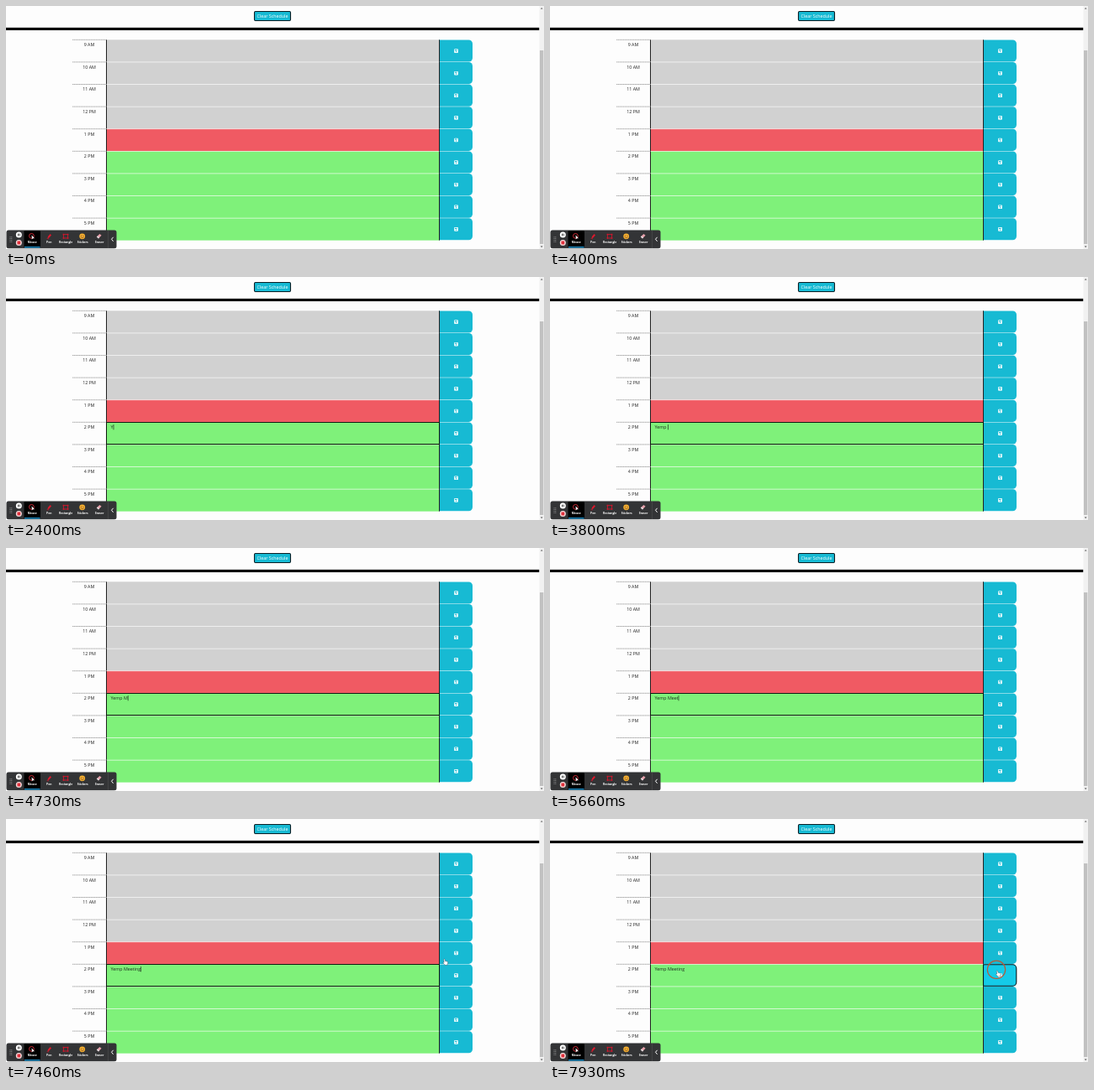
These frames come from a looping animation (640 px wide and 290 px high, 8 s). An HTML page with a canvas:

```html
<!DOCTYPE html>
<html lang="en">
<head>
<meta charset="utf-8">
<title>Day planner</title>
<style>
html, body { margin: 0; width: 100%; height: 100%; overflow: hidden; background: #fdfdfd; }
canvas { display: block; width: 640px; height: 290px; }
</style>
</head>
<body>
<canvas id="stage"></canvas>
<script>
const canvas = document.getElementById('stage');
const dpr = window.devicePixelRatio || 1;
canvas.width = 640 * dpr;
canvas.height = 290 * dpr;
const c = canvas.getContext('2d');

const LOOP = 8000, TOP = 40.3, ROW = 26.6, LEFT = 119, RIGHT = 515, END = 555;
const TEAL = '#17bad3', GREY = '#d1d1d1', RED = '#f05a63', GREEN = '#7ff17a';
const FONT = '"Open Sans", "Noto Sans", sans-serif';
const HOURS = ['9 AM', '10 AM', '11 AM', '12 PM', '1 PM', '2 PM', '3 PM', '4 PM', '5 PM'];
const ENTRY = 'Yemp Meeting';
const FOCUS = 1130, SAVE = 7930, BLINK = 530;
// [time, characters typed]
const KEYS = [[FOCUS, 0], [2400, 1], [3060, 2], [3260, 3], [3600, 4], [3660, 5],
  [4600, 6], [4800, 7], [5460, 8], [5660, 9], [5930, 11], [6060, 12]];

function rect(x, y, w, h, fill) {
  c.fillStyle = fill;
  c.fillRect(x, y, w, h);
}

function round(x, y, w, h, r, fill, stroke, lw = 1) {
  c.beginPath();
  c.roundRect(x, y, w, h, r);
  if (fill) { c.fillStyle = fill; c.fill(); }
  if (stroke) { c.strokeStyle = stroke; c.lineWidth = lw; c.stroke(); }
}

function dot(x, y, r, fill) {
  c.beginPath();
  c.arc(x, y, r, 0, 7);
  c.fillStyle = fill;
  c.fill();
}

function ring(x, y, r, color, lw) {
  c.beginPath();
  c.arc(x, y, r, 0, 7);
  c.strokeStyle = color;
  c.lineWidth = lw;
  c.stroke();
}

function path(points, fill, stroke, lw = 1) {
  c.beginPath();
  points.forEach(([x, y]) => c.lineTo(x, y));
  if (fill) { c.closePath(); c.fillStyle = fill; c.fill(); }
  if (stroke) { c.strokeStyle = stroke; c.lineWidth = lw; c.stroke(); }
}

function text(s, x, y, color, size = 5.33, align = 'center', weight = 400) {
  c.font = `${weight} ${size}px ${FONT}`;
  c.textAlign = align;
  c.fillStyle = color;
  c.fillText(s, x, y);
}

function header() {
  round(295.5, 6.5, 43, 11, 1.2, TEAL, '#0b1d24', 1.1);
  text('Clear Schedule', 317, 13.9, '#fff', 5.33, 'center', 500);
  rect(0, 25.8, 634.5, 3.1, '#000');
}

function scrollbar() {
  rect(634.5, 0, 5.5, 290, '#f1f1f1');
  rect(635, 53, 4.3, 231, '#c1c1c1');
  path([[635.8, 3.6], [637.2, 2], [638.6, 3.6]], '#555');
  path([[635.8, 286.6], [637.2, 288.2], [638.6, 286.6]], '#555');
}

function floppy(x, y) {
  round(x - 2.3, y - 2.3, 4.6, 4.6, 0.7, '#fff');
  rect(x - 1.5, y - 1.6, 2.5, 1.2, TEAL);
  dot(x, y + 0.9, 0.75, TEAL);
}

function row(label, i, saved) {
  const y = TOP + ROW * i;
  c.setLineDash([1.5, 0.5]);
  path([[79, y], [LEFT, y]], null, '#555', 0.5);
  c.setLineDash([]);
  text(label, 99, y + 7.8, '#222');
  rect(LEFT, y, RIGHT - LEFT, ROW, i < 4 ? GREY : i === 4 ? RED : GREEN);
  if (i) rect(LEFT, y - 0.35, RIGHT - LEFT, 0.8, 'rgba(255,255,255,.7)');
  rect(LEFT, y, 1, ROW, '#222');
  const lit = saved && i === 5;
  round(RIGHT, y + 0.1, END - RIGHT, ROW - 0.5, [0, 4.5, 4.5, 0], lit ? '#14cbe8' : TEAL);
  rect(RIGHT, y, 1, ROW, '#222');
  floppy(535.5, y + 13.3);
  if (lit) round(RIGHT + 0.5, y + 0.4, END - RIGHT - 0.7, ROW - 1, [1, 4.5, 4.5, 1], null, '#06181c', 1.1);
}

function entry(t) {
  if (t < FOCUS) return;
  const [start, count] = KEYS.filter(k => k[0] <= t).pop();
  const typed = ENTRY.slice(0, count), y = TOP + ROW * 5;
  text(typed, 124.6, y + 7.9, '#1c2c1c', 5.33, 'left');
  if (t >= SAVE) return;
  c.strokeStyle = '#101a10';
  c.lineWidth = 1;
  c.strokeRect(LEFT + 0.5, 173.5, RIGHT - LEFT, 26);
  const on = Math.floor((t - start) / BLINK) % 2 === 0;
  if (on) rect(124.7 + c.measureText(typed).width, y + 2.8, 0.6, 6.2, '#111');
}

function toolbar() {
  round(0.5, 267.5, 131, 21.8, 2.5, '#333436');
  round(21.5, 268.3, 19.5, 20.2, 1, '#000');
  rect(22, 287.2, 18.5, 1.3, '#1c9fe0');
  rect(121, 268, 0.5, 21, '#555');
  for (let i = 0; i < 8; i++) dot(5 + (i % 2) * 1.8, 275.8 + (i >> 1) * 1.8, 0.5, '#aaa');
  dot(15.3, 273, 3.5, '#fff');
  rect(14, 271.6, 0.9, 2.8, '#333');
  rect(15.7, 271.6, 0.9, 2.8, '#333');
  dot(15.3, 282.5, 3.5, '#f6dcdc');
  round(13.4, 280.6, 3.8, 3.8, 0.6, '#e0303c');

  ring(30.4, 274.4, 2.9, '#e0303c', 0.9);
  path([[30.6, 273.4], [30.8, 278.4], [32, 277.2], [34, 277.2]], '#fff');
  path([[49.4, 277.2], [50, 275], [52.6, 272], [54, 273.4], [51.4, 276.4]], '#e0182d');
  path([[48.6, 278], [51, 277.6]], null, '#e0182d', 0.7);
  c.strokeStyle = '#d0182d';
  c.lineWidth = 0.9;
  c.strokeRect(68.4, 272.6, 5.2, 4.4);
  [[68.4, 272.6], [73.6, 272.6], [68.4, 277], [73.6, 277]]
    .forEach(([x, y]) => rect(x - 0.8, y - 0.8, 1.6, 1.6, '#d0182d'));
  dot(90.7, 274.8, 3.4, '#f6b02f');
  dot(89.5, 274, 0.5, '#533');
  dot(91.9, 274, 0.5, '#533');
  c.beginPath();
  c.arc(90.7, 275, 1.7, 0.2, 2.9);
  c.strokeStyle = '#533';
  c.lineWidth = 0.6;
  c.stroke();
  path([[107.8, 275.6], [111.4, 272], [113.6, 273.8], [110, 277.6]], '#e8a0ac');
  path([[107.8, 275.6], [109, 274.4], [111.2, 276.4], [110, 277.6]], '#ddd');
  ['Mouse', 'Pen', 'Rectangle', 'Stickers', 'Eraser'].forEach((s, i) =>
    text(s, 31.2 + i * 20, 283.4, '#fff', 3.3, 'center', 700));
  path([[127.6, 275.8], [125.5, 278.3], [127.6, 280.8]], null, '#fff', 1);
}

function hand(x, y) {
  c.save();
  c.translate(x, y);
  c.beginPath();
  c.moveTo(0.2, 0.5);
  c.quadraticCurveTo(0.9, -0.4, 1.6, 0.5);
  c.lineTo(2, 2.5);
  c.lineTo(4.4, 3);
  c.quadraticCurveTo(5.4, 3.3, 5.2, 4.6);
  c.lineTo(4.6, 7.2);
  c.lineTo(1.8, 7.2);
  c.lineTo(-0.6, 4.6);
  c.quadraticCurveTo(-0.4, 3.6, 0.7, 4.3);
  c.closePath();
  c.fillStyle = '#fff';
  c.fill();
  c.strokeStyle = '#234';
  c.lineWidth = 0.4;
  c.stroke();
  c.restore();
}

function pointer(t) {
  if (t < 7460) return;
  const p = Math.min(1, (t - 7460) / 400), e = p * (2 - p);
  hand(520.4 + 10.6 * e, 167 + 13.8 * e);
}

function ripple(t, start, x, y) {
  const p = (t - start) / 200;
  if (p < 0 || p >= 1) return;
  c.globalAlpha = 1 - 0.6 * p;
  ring(x, y, 10.7, '#b85a38', 1.2);
  c.globalAlpha = 1;
}

function draw(t) {
  c.setTransform(dpr, 0, 0, dpr, 0, 0);
  rect(0, 0, 640, 290, '#fdfdfd');
  header();
  scrollbar();
  HOURS.forEach((h, i) => row(h, i, t >= SAVE));
  entry(t);
  toolbar();
  pointer(t);
  ripple(t, FOCUS, 130, 188.8);
  ripple(t, SAVE, 531, 179.8);
}

const begin = performance.now();
function frame() {
  draw((performance.now() - begin) % LOOP);
  requestAnimationFrame(frame);
}
frame();
</script>
</body>
</html>
```
